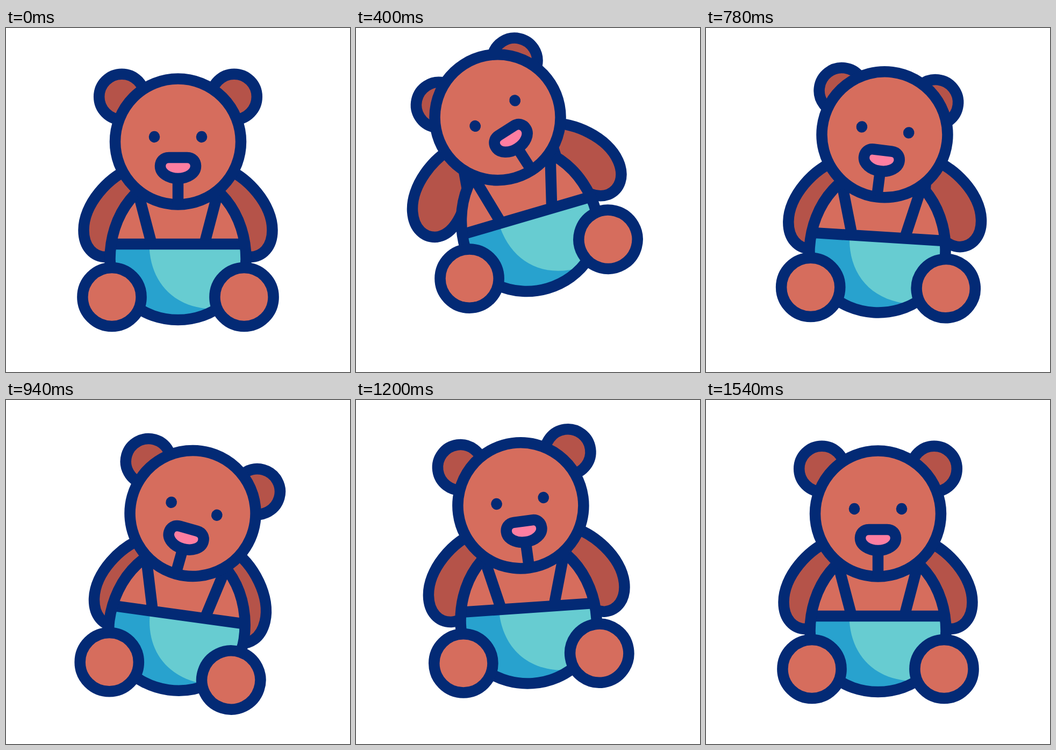
Animation, 640 px wide and 640 px high, one loop 1860 ms. Source, as an HTML page:

```html
<!DOCTYPE html>
<html lang="en">
<head>
<meta charset="utf-8">
<title>Teddy bear</title>
<style>
  html, body { margin: 0; height: 100%; overflow: hidden; background: #fff; }
  svg { display: block; width: 100vw; height: 100vh; }
  .line { stroke: #032a75; stroke-width: 20.5; }
  .fur { fill: #d66d5d; }
  .shade { fill: #b55349; }
  .none { fill: none; }
</style>
</head>
<body>
<svg viewBox="0 0 640 640">
  <defs>
    <path id="torso" d="M193.5 430A126.5 156 0 0 1 446.5 430A126.5 113 0 0 1 193.5 430Z"/>
    <clipPath id="torsoClip"><use href="#torso"/></clipPath>
    <circle id="ear" class="line shade" cx="215.5" cy="128" r="42.3"/>
    <path id="arm" class="line shade" d="M240 258C188 276 144.5 330 144.5 376C144.5 408 163 426 186 426C215 424 235 395 250 350Z"/>
    <circle id="foot" class="line fur" cx="197" cy="500.5" r="54.6"/>
  </defs>
  <g id="bear">
    <g class="tilt">
      <use id="earL" href="#ear"/>
      <g transform="matrix(-1 0 0 1 640 0)"><use id="earR" href="#ear"/></g>
    </g>
    <use id="armL" href="#arm"/>
    <g transform="matrix(-1 0 0 1 640 0)"><use id="armR" href="#arm"/></g>

    <use href="#torso" class="fur"/>
    <g clip-path="url(#torsoClip)">
      <path fill="#28a2ce" d="M180 402H460V560H180Z"/>
      <path fill="#67ccd1" d="M266.5 402C267 470 310 523 390 523L460 510V402Z"/>
    </g>
    <path class="line none" d="M245 303L271 402M395 303L369 402M194 402H446"/>
    <use href="#torso" class="line none"/>

    <use id="footL" href="#foot"/>
    <g transform="matrix(-1 0 0 1 640 0)"><use id="footR" href="#foot"/></g>

    <g class="tilt">
      <circle class="line fur" cx="320" cy="211.5" r="117"/>
      <g fill="#032a75">
        <ellipse cx="276" cy="202.5" rx="10.3" ry="10.7"/>
        <ellipse cx="364" cy="202.5" rx="10.3" ry="10.7"/>
      </g>
      <path class="line" d="M320 280V326"/>
      <path class="line" fill="#fe7ea1" d="M303 241H337C347 241 353 248 353 257C353 270 338 280 320 280C302 280 287 270 287 257C287 248 293 241 303 241Z"/>
    </g>
  </g>
</svg>
<script>
  const LOOP = 1860, LAG = 90;
  const $ = id => document.getElementById(id);
  const place = (el, value) => el.setAttribute('transform', value);
  const tilted = document.querySelectorAll('.tilt');

  // The swing: left, right, a little left, rest
  const swingTimes = [0, 556, 885, 1110, 1450];
  const lean = [0, -19.6, 9.8, -4.6, 0];
  const lift = [0, -64, 0, -18.4, 0];

  // The ears slide behind the head
  const earTimes = [0, 160, 400, 640, 940, 1200, 1540];
  const ears = {
    earL: [[0, 6, 25, 29.5, -1, 3, 0], [0, 1.6, 5, 9, 13, -2, 0]],
    earR: [[0, 4, 21, 33, 0, 4, 0], [0, 4.5, 12, 11, 12, -3.5, 0]]
  };

  const ease = u => u ** 1.7 / (u ** 1.7 + (1 - u) ** 1.7);

  function eased(times, values, t) {
    const i = times.findIndex(end => t < end);
    if (i < 1) return 0;
    const u = (t - times[i - 1]) / (times[i] - times[i - 1]);
    return values[i - 1] + (values[i] - values[i - 1]) * ease(u);
  }

  function smooth(times, values, t) {
    const i = times.findIndex(end => t < end);
    if (i < 1) return 0;
    const slope = k => k < 1 || k > times.length - 2 ? 0
      : (values[k + 1] - values[k - 1]) / (times[k + 1] - times[k - 1]);
    const span = times[i] - times[i - 1], u = (t - times[i - 1]) / span, v = 1 - u;
    return v * v * ((1 + 2 * u) * values[i - 1] + u * span * slope(i - 1))
         + u * u * ((1 + 2 * v) * values[i] - v * span * slope(i));
  }

  function draw(t) {
    const angle = eased(swingTimes, lean, t);
    const late = eased(swingTimes, lean, t - LAG);
    place($('bear'), `translate(0 ${eased(swingTimes, lift, t)}) rotate(${angle} 320 412)`);
    tilted.forEach(el => place(el, `rotate(${angle} 320 211.5)`));
    for (const id in ears)
      place($(id), `translate(${ears[id].map(track => smooth(earTimes, track, t))})`);
    place($('armL'), `rotate(${-0.75 * angle} 320 235)`);
    place($('armR'), `rotate(${-0.63 * late} 320 235)`);
    place($('footL'), `rotate(${-angle} 247 451.5)`);
    place($('footR'), `rotate(${-1.17 * late} 247 451.5)`);
  }

  const start = performance.now();
  function tick() {
    draw((performance.now() - start) % LOOP);
    requestAnimationFrame(tick);
  }
  tick();
</script>
</body>
</html>
```
